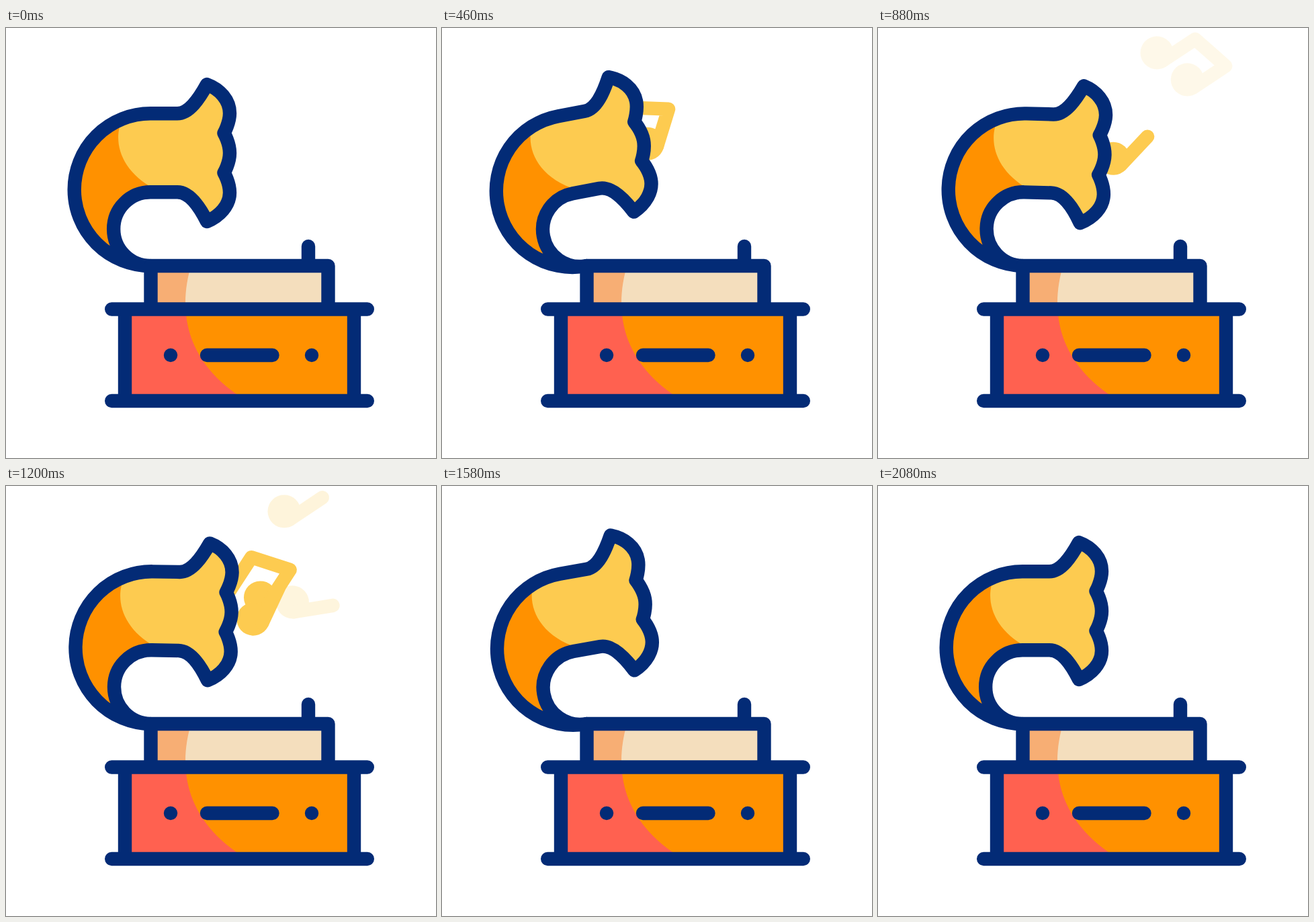
An HTML page that plays this animation: 640x640 px, repeating every 2400 ms.

```html
<!DOCTYPE html>
<html lang="en">
<head>
<meta charset="utf-8">
<title>Gramophone</title>
<style>
  html, body { margin: 0; width: 100%; height: 100%; overflow: hidden; background: #fff; }
  svg { display: block; width: 100vw; height: 100vh; }
  .line, #notes path { fill: none; stroke: #032b76; stroke-width: 20.4; stroke-linecap: round; stroke-linejoin: round; }
  #notes { fill: #fdcb50; }
  #notes path { stroke: #fdcb50; }
</style>
</head>
<body>
<svg viewBox="0 0 640 640">
  <defs>
    <path id="shape" d="M215 354A113.3 113.3 0 0 1 215 127.3H255C273 127.3 288 104 299 84C318 91 333 107 333 127
      C333 141 324.5 156.5 324.5 156.5S333 171 333 186S324.5 215.5 324.5 215.5S333 230 333 245
      C333 264 318 280 299 288C288 266 273 244.3 255 244.3H215A54.8 54.8 0 0 0 215 354Z"/>
    <clipPath id="inside"><use href="#shape"/></clipPath>
  </defs>

  <g id="notes"></g>

  <g id="horn">
    <use href="#shape" fill="#ff9100"/>
    <path clip-path="url(#inside)" fill="#fdcb50" d="M174 134C158 165 168 212 222 240L350 320V70H174Z"/>
    <use href="#shape" class="line"/>
  </g>

  <path fill="#f4debd" d="M215.5 354H479.5V418H215.5Z"/>
  <path fill="#ff9100" d="M177 418H518V555H177Z"/>
  <clipPath id="left"><path d="M150 350H276.5C254.5 420 266.5 500 358.5 555H150Z"/></clipPath>
  <g clip-path="url(#left)">
    <path fill="#f7ae74" d="M215.5 354H400V418H215.5Z"/>
    <path fill="#ff6150" d="M177 418H400V555H177Z"/>
  </g>
  <path class="line" d="M215.5 418.5V354H479.5V418.5M450 325V354M157.2 418.5H537.8M157.2 555H537.8M177 418.5V555M518 418.5V555
    M299 487H396.5M245 487h0M455 487h0"/>
</svg>

<script>
const LOOP = 2400, FADE = 150;

// [time, degrees]
const swing = [[0, 0], [420, -10.8], [965, 2.3], [1075, 2.3], [1660, -10.6], [2080, 0], [LOOP, 0]];

// Each note's head travels in a straight line while the note turns about it.
const notes = [
  { pair: true, start: 202, end: 898, from: [172, 228], to: [415.5, 36.6], turn: 56.5 },
  { start: 500, end: 1228, from: [262.4, 219], to: [427, 172.7], turn: 81 },
  { start: 620, end: 1230, from: [172, 228], to: [415.5, 36.6], turn: 56.5 },
  { pair: true, start: 840, end: 1470, from: [172, 228], to: [416, 96], turn: 54 },
  { start: 840, end: 1480, from: [262.4, 219], to: [439, 184], turn: 42 },
];

const single = '<circle r="24.6"/><path d="M14.6 0V-58.6"/>';
const double = '<circle r="24.6"/><circle cx="58.3" cy="-15.6" r="24.6"/><path d="M14.6 0V-58.6L72.9 -74.2V-15.6"/>';

const horn = document.getElementById('horn');
const layer = document.getElementById('notes');
layer.innerHTML = notes.map(n => `<g>${n.pair ? double : single}</g>`).join('');

const ease = p => (1 - Math.cos(Math.PI * p)) / 2;
const mix = (a, b, p) => a + (b - a) * p;

function swingAt(t) {
  const i = swing.findIndex(k => k[0] > t);
  const [t0, a0] = swing[i - 1], [t1, a1] = swing[i];
  return mix(a0, a1, ease((t - t0) / (t1 - t0)));
}

function draw(t) {
  horn.setAttribute('transform', `rotate(${swingAt(t)} 215 354)`);
  notes.forEach((n, i) => {
    const g = layer.children[i];
    const live = t >= n.start && t < n.end;
    g.setAttribute('display', live ? 'inline' : 'none');
    if (!live) return;
    const u = ease((t - n.start) / (n.end - n.start));
    const x = mix(n.from[0], n.to[0], u), y = mix(n.from[1], n.to[1], u);
    g.setAttribute('transform', `translate(${x} ${y}) rotate(${n.turn * u})`);
    g.setAttribute('opacity', Math.min(1, (n.end - t) / FADE));
  });
}

const begin = performance.now();
function tick() {
  const t = (performance.now() - begin) % LOOP;
  draw(Math.floor(t / 20) * 20);
  requestAnimationFrame(tick);
}
tick();
</script>
</body>
</html>
```
